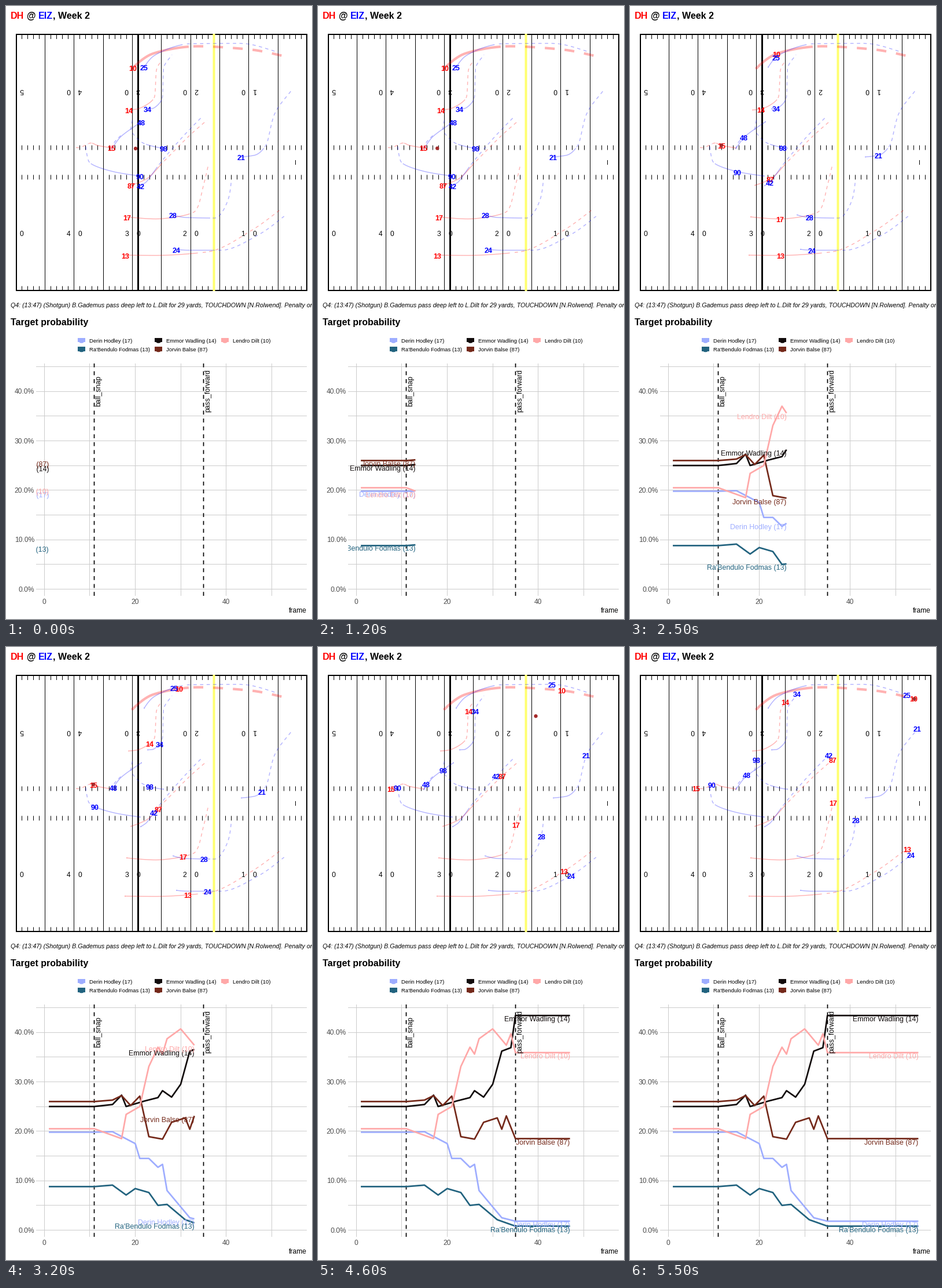
A matplotlib script for the animation above (6.5 s loop, 529x1058 px).

```python
import numpy as np
import matplotlib.pyplot as plt
from matplotlib.animation import FuncAnimation
from matplotlib.patches import Ellipse, Rectangle

W, H, DPI = 529, 1058, 100
PX = 72 / DPI                       # points per pixel
LAST, FRAMES, INTERVAL = 55, 65, 100
SNAP, PASS = 11, 35
RED, BLUE, BALL = "#ff0000", "#0000ff", "#a52a2a"

plt.rcParams["font.family"] = "Liberation Sans"
fig = plt.figure(figsize=(W / DPI, H / DPI), dpi=DPI, facecolor="white")
ax = fig.add_axes([0, 0, 1, 1])
ax.set_xlim(0, W)
ax.set_ylim(H, 0)
ax.axis("off")


def text(x, y, s, size=12.5, color="black", z=5, angle=0, **kw):
    """Text whose capitals are centred on (x, y) across its baseline."""
    drop, a = 0.36 * size, np.radians(angle)
    return ax.text(x + drop * np.sin(a), y + drop * np.cos(a), s, color=color,
                   fontsize=size * PX, rotation=angle, rotation_mode="anchor",
                   va="baseline", zorder=z, **kw)


def line(xs, ys, color="black", width=1.0, z=1, dashed=False, **kw):
    # dash lengths are multiples of the line width
    return ax.plot(xs, ys, color=color, lw=width * PX, zorder=z, snap=False,
                   ls=(0, (4, 4)) if dashed else "-",
                   dash_capstyle="butt", solid_capstyle="butt", **kw)[0]


def vline(x, span, *args, **kw):
    line([np.floor(x) + 0.5] * 2, span, *args, **kw)


def hline(y, span, *args, **kw):
    line(span, [np.floor(y) + 0.5] * 2, *args, **kw)


def smooth(t, v):
    """Monotone cubic through (t, v), sampled at every step."""
    h = np.diff(t)
    d = np.diff(v) / h
    m = np.zeros(len(v))
    m[0], m[-1] = d[0], d[-1]
    for k in range(1, len(d)):
        if d[k - 1] * d[k] > 0:
            m[k] = 2 * d[k - 1] * d[k] / (d[k - 1] + d[k])
    steps = np.arange(LAST + 1)
    k = np.clip(np.searchsorted(t, steps, "right") - 1, 0, len(d) - 1)
    u = (steps - t[k]) / h[k]
    return ((1 + 2 * u) * (1 - u) ** 2 * v[k] + u * (1 - u) ** 2 * h[k] * m[k]
            + u * u * (3 - 2 * u) * v[k + 1] + u * u * (u - 1) * h[k] * m[k + 1])


# ---- headings -------------------------------------------------------------
for x, s, c in [(8, "DH", RED), (35, "@", "black"), (56, "EIZ", BLUE),
                (81, ", Week 2", "black")]:
    text(x, 16, s, 16, c, weight="bold")
text(8, 516, "Q4: (13:47) (Shotgun) B.Gademus pass deep left to L.Dilt for "
     "29 yards, TOUCHDOWN [N.Rolwend]. Penalty on", 10.67, style="italic")
text(8.5, 545, "Target probability", 16, weight="bold")

# ---- field ----------------------------------------------------------------
LEFT, YARD, TOP, BOTTOM = 17.2, 10.066, 49, 491
HASHES = [(50, 57), (240.5, 248.5), (291.5, 299.5), (483.5, 491)]

for n in range(1, 50):
    for span in HASHES if n % 5 else [(TOP, BOTTOM)]:
        vline(LEFT + n * YARD, span)
vline(500.5, (266, 274))

for k, digit in enumerate("54321"):
    x = LEFT + 10 * k * YARD
    if k:
        text(x - 10, 393, digit, 12, z=1, ha="center")
        text(x - 10, 147, "0", 12, z=1, angle=180, ha="center")
    text(x + 10, 393, "0", 12, z=1, ha="center")
    text(x + 10, 147, digit, 12, z=1, angle=180, ha="center")

ax.add_patch(Rectangle((18, TOP), 502, BOTTOM - TOP, fill=False, ec="black",
                       lw=2 * PX, zorder=2, snap=False))
vline(228, (TOP, BOTTOM), width=3, z=2)
vline(359, (TOP - 1, BOTTOM + 1), "#ffff70", 4, 2)

# ---- players --------------------------------------------------------------
# Everyone stands until just after the snap, then passes one waypoint per beat.
BEATS = np.array([0, SNAP + 3, 25, 36, 46, LAST])
players = []


def player(number, color, *points, width=1.42):
    """Route through the waypoints: solid until the pass, dashed after it."""
    x, y = np.array(points[:1] + points, float).T
    pos = np.column_stack([smooth(BEATS, x), smooth(BEATS, y)])
    for part, dashed in [(pos[:PASS], False), (pos[PASS:LAST], True)]:
        line(*part.T, color, width, 3, dashed, alpha=0.3)
    label = text(0, 0, number, 12.5, color, 4 + 0.1 * (color == BLUE),
                 weight="bold", ha="center")
    players.append((label, pos))
    return pos


receiver = player("10", RED, (219, 107), (253, 82.5), (332, 69.5), (421, 75),
                  (490, 88.5), width=4.27)
passer = player("15", RED, (182.5, 245), (158, 240.5), (146.5, 236.5),
                (126, 244.5), (114, 243.5))
player("14", RED, (212, 179.5), (226, 178), (257, 156), (260, 111), (268, 95))
player("87", RED, (216, 309.5), (242, 299), (277, 264), (319, 222), (351, 194))
player("17", RED, (209, 364), (259, 367.5), (326, 355), (342, 307), (351, 269))
player("13", RED, (206, 430), (260, 430.5), (348, 424.5), (425, 387), (479, 348))
player("25", BLUE, (239, 105.5), (253, 88), (320, 65), (405, 64.5), (479, 82))
player("34", BLUE, (245, 177.5), (253, 177), (270.5, 157), (272, 110), (289, 81))
player("48", BLUE, (234, 200), (197, 227), (183, 246.5), (187, 236), (202, 220))
player("98", BLUE, (272, 245.5), (265, 244.5), (237, 236.5), (216, 212), (219, 195))
player("90", BLUE, (232, 293.5), (186, 286), (143, 268), (138, 242), (142, 237.5))
player("42", BLUE, (233, 310), (241.5, 304.5), (267.5, 270), (308, 223), (344, 186))
player("28", BLUE, (289, 360.5), (310, 365), (361, 366), (386, 327), (390, 298))
player("24", BLUE, (295, 420), (315, 421.5), (373, 421.5), (438, 394), (486, 359))
player("21", BLUE, (407, 260.5), (430, 257.5), (449, 241), (464, 187), (497, 141))

CATCH = 50


def ball_at(step):
    """Rests at the line, is snapped, held, thrown straight and caught."""
    rest = np.array([224 - 0.5 * min(step, 10), 246])
    if step < 16:
        return rest + (passer[16] - rest) * max(0, step - 10) / 6
    if step < PASS:
        return passer[step]
    if step < CATCH:
        part = (step - PASS + 1) / (CATCH - PASS + 1)
        return passer[PASS - 1] + (receiver[CATCH] - passer[PASS - 1]) * part
    return receiver[step] + (1.5, 1)


ball = Ellipse((0, 0), 6.4, 6.4, fc=BALL, ec="none", zorder=5)
ax.add_patch(ball)

# ---- chart ----------------------------------------------------------------
X0, X1, Y0, Y1 = 52, 520, 617, 1018


def chart_x(frame):
    return 66.2 + 7.86 * frame


def chart_y(percent):
    return 1006.4 - 8.533 * percent


for p in range(0, 50, 5):
    hline(chart_y(p), (X0, X1), "#cccccc")
    if p % 10 == 0:
        text(49, chart_y(p), f"{p}.0%", 12, "#4d4d4d", ha="right")
for f in range(0, 60, 10):
    vline(chart_x(f), (Y0, Y1), "#cccccc")
    if f in (0, 20, 40):
        text(chart_x(f), 1027.5, str(f), 12, "#4d4d4d", ha="center")
text(520, 1042.5, "frame", 12, ha="right")

for f, s in [(SNAP, "ball_snap"), (PASS, "pass_forward")]:
    vline(chart_x(f), (Y1, Y0), width=1.7, z=2, dashed=True)
    text(chart_x(f) + 6.5, 664, s, 12.2, angle=90, ha="center")

panel = Rectangle((X0, Y0), X1 - X0, Y1 - Y0, fc="none", ec="none")
ax.add_patch(panel)

curves = []


def curve(name, color, key_x, key_y, *turns):
    """Straight runs between (frame, percent) turns, level outside them."""
    y = chart_y(np.interp(np.arange(1, LAST + 1), *np.array(turns).T))
    path = line([], [], color, 2.7, 3, solid_joinstyle="round")
    label = text(0, 0, name, 12.45, color, 4, ha="right", clip_on=True)
    label.set_clip_path(panel)
    curves.append((path, label, y))
    ax.add_patch(Rectangle((key_x, key_y - 4), 13, 7.5, fc=color, ec="none"))
    ax.add_patch(Ellipse((key_x + 6.5, key_y + 3.3), 8, 4, fc=color, ec="none"))
    text(key_x + 20.3, key_y + 1, name, 9.5)


curve("Derin Hodley (17)", "#9eadff", 124, 576.5,
      (SNAP, 19.8), (15, 19.9), (20, 17.5), (21, 14.5), (23, 14.5), (25, 12.7),
      (26, 13.3), (27, 8), (32, 2.5), (PASS, 1.8))
curve("Ra'Bendulo Fodmas (13)", "#22637f", 124, 592,
      (SNAP, 8.8), (15, 9.1), (18, 7.1), (20, 8.4), (23, 7.6), (25, 5),
      (27, 5.2), (31, 2.1), (PASS, 0.8))
curve("Emmor Wadling (14)", "#120c0c", 257, 576.5,
      (SNAP, 25), (15, 25.4), (17, 27.3), (18, 25), (22, 26.1), (25, 26.8),
      (26, 28.2), (28, 26.9), (30, 29.5), (32, 36.2), (34, 36.9), (PASS, 43.4))
curve("Jorvin Balse (87)", "#74291a", 257, 592,
      (SNAP, 26), (15, 26.3), (17, 27.2), (19, 25.2), (21, 27.1), (23, 18.9),
      (26, 18.4), (28, 21.8), (31, 22.7), (32, 20.4), (33, 23.1), (PASS, 18.5))
curve("Lendro Dilt (10)", "#ffa8a8", 372, 576.5,
      (SNAP, 20.5), (17, 18.5), (18, 23.4), (21, 25), (23, 33.1), (25, 37),
      (26, 35.6), (27, 38.7), (30, 40.7), (33, 37.4), (34, 39.7), (PASS, 35.9))


def update(i):
    step = min(i, LAST)
    for label, pos in players:
        x, y = pos[step]
        label.set_position((x, y + 1 + 0.36 * 12.5))
    ball.set_center(ball_at(step))
    n = min(step + 1, LAST)
    for path, label, y in curves:
        path.set_data(chart_x(np.arange(1, n + 1)), y[:n])
        label.set_position((chart_x(n), y[n - 1] + 10.4))
    return []


anim = FuncAnimation(fig, update, frames=FRAMES, interval=INTERVAL,
                     repeat=True, repeat_delay=0, blit=False)
plt.show()
```
